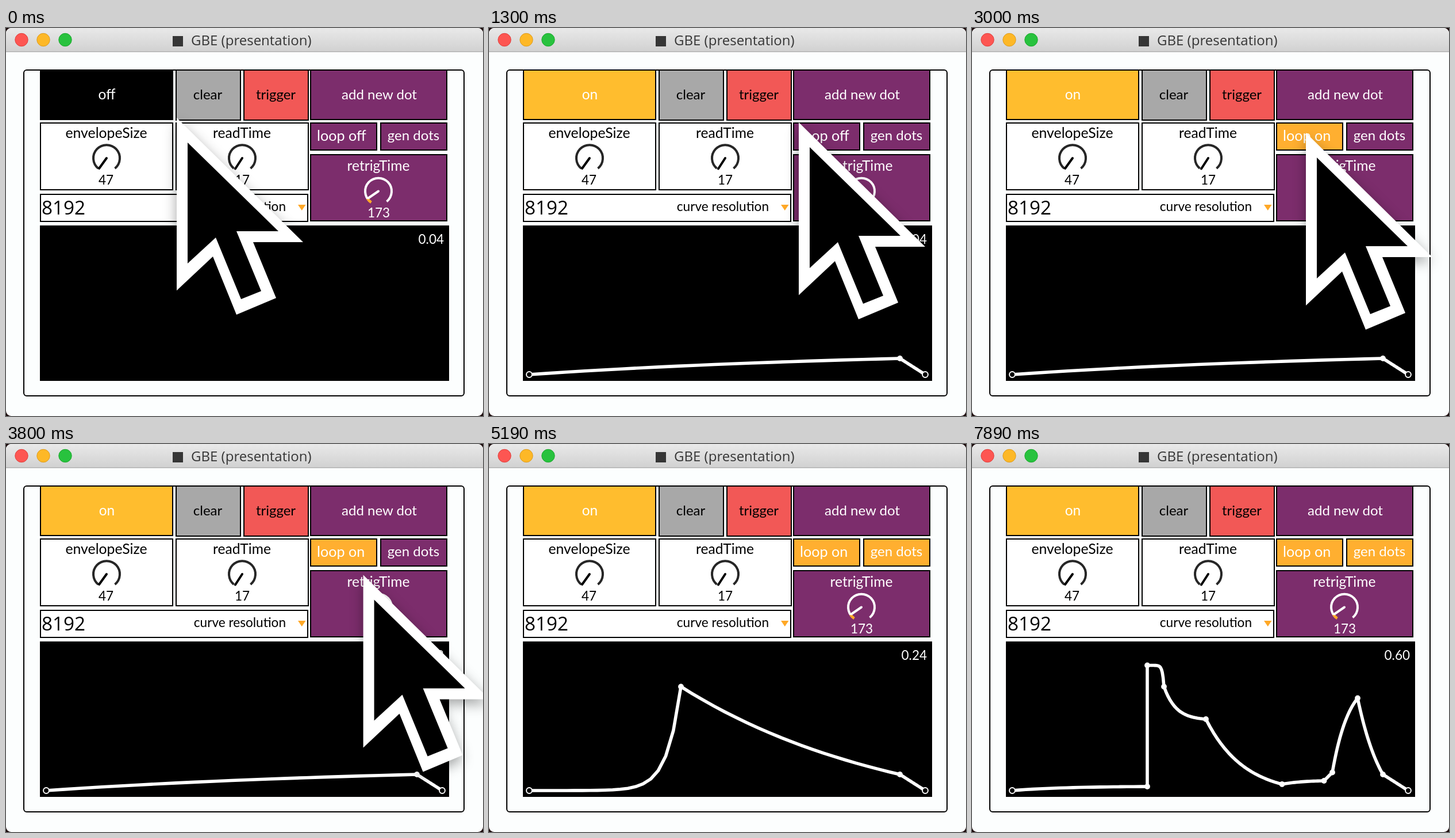
Animation, 830 px wide and 674 px high, one loop 7.99 s. Source, as an HTML page:

```html
<!DOCTYPE html>
<html lang="en">
<head>
<meta charset="utf-8">
<title>GBE</title>
<style>
  html, body { margin: 0; width: 830px; height: 674px; overflow: hidden; background: #1c0a0c; }
  svg { display: block; font-family: Lato, sans-serif; }
  .box { stroke: #000; stroke-width: 2; }
  #cursor { filter: drop-shadow(0 8px 11px rgba(0, 0, 0, .36)); }
</style>
</head>
<body>
<svg width="830" height="674" viewBox="0 0 830 674">
  <defs>
    <linearGradient id="bar" x2="0" y2="1">
      <stop stop-color="#e9e9e9"/><stop offset="1" stop-color="#d1d1d1"/>
    </linearGradient>
    <clipPath id="window"><rect width="830" height="674" rx="9"/></clipPath>
  </defs>
  <g clip-path="url(#window)">
    <rect width="830" height="674" fill="#fcfefe"/>
    <rect width="830" height="41" fill="url(#bar)"/>
    <rect y="40.5" width="830" height="1.5" fill="#b4b4b4"/>
  </g>
  <g stroke-width="1">
    <circle cx="27" cy="20.5" r="11.2" fill="#fd5652" stroke="#df3f3d"/>
    <circle cx="65" cy="20.5" r="11.2" fill="#fdb827" stroke="#dd9b1d"/>
    <circle cx="103" cy="20.5" r="11.2" fill="#28c23e" stroke="#1aa82c"/>
  </g>
  <rect x="290" y="14" width="18" height="18" fill="#363636"/>
  <text x="322" y="30" font-size="24" fill="#363636" style="font-family:'Open Sans',sans-serif">GBE (presentation)</text>
  <rect x="31" y="73" width="766" height="566" rx="5" fill="none" stroke="#000" stroke-width="2"/>
  <g id="panel"></g>
  <path d="M508 307h13.5l-6.75 10z" fill="#ffa826"/>
  <rect x="59" y="343" width="712" height="270"/>
  <g id="envelope" fill="#fff" stroke="#fff"></g>
  <text id="readout" x="762" y="375" font-size="22.5" fill="#fff" text-anchor="end"></text>
  <g id="cursor">
    <path fill="#fff" d="M0 0L220 216H133L173 313L104 342L63 241L0 300Z"/>
    <path d="M19 43L177 197H104L147 301L112 315L68 208L19 253Z"/>
  </g>
</svg>
<script>
const LOOP = 7990, PURPLE = '#7c2d6c', ORANGE = '#ffaf30', AMBER = '#ffbd2e';
const ON_AT = 100, LOOP_ON_AT = 2700, GEN_ON_AT = 4690, CURVE_AT = 500;
const $ = id => document.getElementById(id);

function add(parent, tag, attrs, text = '') {
  const node = document.createElementNS('http://www.w3.org/2000/svg', tag);
  for (const name in attrs) node.setAttribute(name, attrs[name]);
  node.textContent = text;
  return parent.appendChild(node);
}

const panel = $('panel');
const box = (x, y, width, height, fill) => add(panel, 'rect', { class: 'box', x, y, width, height, fill });
const label = (text, x, y, size, fill = '#000', anchor = 'middle', family = 'Lato') =>
  add(panel, 'text', { x, y, 'font-size': size, fill, 'text-anchor': anchor, style: `font-family:'${family}',sans-serif` }, text);

function dial(x, y, dx, dy, color) {
  const line = (d, stroke, width) => add(panel, 'path', { d, stroke, 'stroke-width': width, fill: 'none' });
  line(`M${x - 14.5} ${y + 18}A23 23 0 1 1 ${x + 14.5} ${y + 18}`, color === '#000' ? '#262626' : color, 4);
  if (color === '#fff') line(`M${x - 12.5} ${y + 19.5}A23 23 0 0 1 ${x - 19} ${y + 13}`, '#ffa826', 4.5);
  line(`M${x} ${y}l${dx} ${dy}`, color, 4).setAttribute('stroke-linecap', 'round');
}

const power = box(60, 73, 230, 86);
const powerText = label('', 175.5, 123.5, 24.5, '#fff');
box(296, 73, 112, 87, '#a8a8a8');
label('clear', 351, 124, 24);
box(414, 73, 112, 87, '#f25856');
label('trigger', 469.5, 124, 24);
box(530, 73, 237, 86, PURPLE);
label('add new dot', 649.5, 124, 24, '#fff');
box(60, 165, 230, 116, '#fff');
label('envelopeSize', 174.5, 191, 24.8);
dial(175, 226, -13, 18, '#000');
label('47', 174, 271.5, 22.5);
box(296, 165, 230, 116, '#fff');
label('readTime', 410.5, 191, 24.6);
dial(411, 226, -12, 18.5, '#000');
label('17', 411, 271.5, 22.5);
const loop = box(530, 165, 115, 47);
const loopText = label('', 541, 196, 25.2, '#fff', 'start');
const gen = box(652, 165, 115, 47);
label('gen dots', 709, 195, 24, '#fff');
box(530, 220, 237, 115, PURPLE);
label('retrigTime', 648, 248, 24.6, '#fff');
dial(648, 283.5, -17.5, 12, '#fff');
label('173', 648.5, 328.5, 22.5, '#fff');
box(60, 289, 465, 47, '#fff');
label('8192', 62, 324, 33.3, '#000', 'start', 'Open Sans');
label('curve resolution', 487, 318, 22.6, '#000', 'end');

// Envelope dots from left to right: x, y, bend of the segment ending here, time of birth
const DOTS = [
  [70, 602, 0, CURVE_AT],
  [305, 595, 2.5, 6290],
  [305, 384.5, -3, 5490],
  [334, 421.5, -11, 5090],
  [407, 478, 3.5, 6690],
  [539.5, 591, 2, 5890],
  [612.5, 585, 2, 7090],
  [627, 570.5, 0, 7490],
  [671, 441.5, 1.5, 7890],
  [715, 574, 1, CURVE_AT],
  [759, 602, 0, CURVE_AT],
].map(([x, y, bend, born]) => ({ x, y, bend, born }));

const ease = (u, bend) => bend ? (1 - Math.exp(-bend * u)) / (1 - Math.exp(-bend)) : u;
const between = (a, b, u) => a + (b - a) * u;

function level(dots, phase) {
  const x = between(70, 759, phase);
  const i = Math.max(1, dots.findIndex(dot => x <= dot.x));
  const a = dots[i - 1], b = dots[i];
  return (602 - between(a.y, b.y, ease((x - a.x) / (b.x - a.x), b.bend))) / 233;
}

function drawEnvelope(dots) {
  const group = $('envelope');
  group.textContent = '';
  if (!dots.length) return;
  let d = `M${dots[0].x} ${dots[0].y}`;
  for (let i = 1; i < dots.length; i++) {
    const a = dots[i - 1], b = dots[i];
    for (let s = 1; s <= 20; s++)
      d += `L${between(a.x, b.x, s / 20)} ${between(a.y, b.y, ease(s / 20, b.bend))}`;
  }
  add(group, 'path', { d, fill: 'none', 'stroke-width': 5.6, 'stroke-linejoin': 'round' });
  dots.forEach(({ x, y }, i) => {
    const end = i === 0 || i === dots.length - 1;
    add(group, 'circle', end
      ? { cx: x, cy: y, r: 4.9, fill: '#000', 'stroke-width': 2 }
      : { cx: x, cy: y, r: 4.9, stroke: 'none' });
  });
}

// Keys: time, then values
const CURSOR = [
  [0, 297, 156], [500, 640, 140], [700, 645, 250], [800, 645, 250], [990, 601, 160],
  [1200, 601, 160], [1300, 539, 164], [1400, 540, 165], [2200, 540, 165], [2400, 560, 185],
  [2700, 600, 250], [3000, 581, 182], [3400, 579, 178], [3700, 579, 178], [4200, 792, 425],
  [4590, 690, 190], [4690, 690, 190], [5090, 870, 700],
];
const PHASE = [
  [1700, .2], [2000, .9], [2700, .9], [4200, 9.92], [5190, 15.785], [6290, 22.25], [7890, 31.42],
];

function at(keys, t) {
  const i = keys.findIndex(key => key[0] > t);
  if (i < 0) return keys[keys.length - 1].slice(1);
  if (i === 0) return keys[0].slice(1);
  const a = keys[i - 1], b = keys[i], u = (t - a[0]) / (b[0] - a[0]);
  return a.slice(1).map((value, n) => between(value, b[n + 1], u));
}

function render(t) {
  const on = t >= ON_AT, looping = t >= LOOP_ON_AT;
  power.setAttribute('fill', on ? AMBER : '#000');
  powerText.textContent = on ? 'on' : 'off';
  loop.setAttribute('fill', looping ? ORANGE : PURPLE);
  loopText.textContent = looping ? 'loop on' : 'loop off';
  gen.setAttribute('fill', t >= GEN_ON_AT ? ORANGE : PURPLE);

  const dots = DOTS.filter(dot => t >= dot.born);
  drawEnvelope(dots);
  $('readout').textContent = t < 1700 ? '0.04' : level(dots, at(PHASE, t)[0] % 1).toFixed(2);
  $('cursor').setAttribute('transform', `translate(${at(CURSOR, t)})`);
}

// The screen refreshes in steps of 100 ms, with one step of 90 ms at 4600
let shown = -1;
function frame() {
  const t = performance.now() % LOOP;
  const shift = t < 4690 ? 0 : 90;
  const step = Math.floor((t - shift) / 100) * 100 + shift;
  if (step !== shown) render(shown = step);
  requestAnimationFrame(frame);
}
frame();
</script>
</body>
</html>
```
